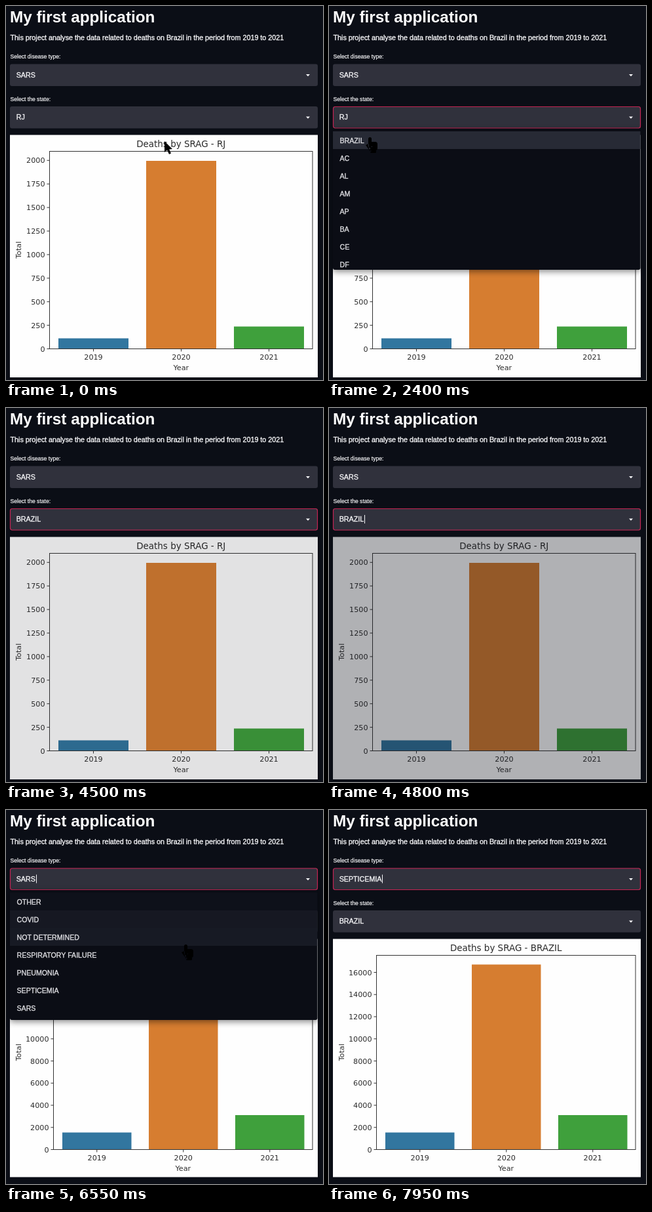
An HTML page with a canvas that plays this animation: 484 by 570 pixels, repeating every 8 s.

```html
<!DOCTYPE html>
<html lang="en">
<head>
<meta charset="utf-8">
<title>My first application</title>
<style>
  html, body { margin: 0; width: 100%; height: 100%; overflow: hidden; background: #0b0e16; }
  canvas { display: block; }
</style>
</head>
<body>
<canvas id="stage" width="484" height="570"></canvas>
<script>
const ctx = document.getElementById('stage').getContext('2d');
const LOOP = 8000;
const BG = '#0b0e16', FIELD = '#30313c', INK = '#f6f6f8';
const UI = '"Liberation Sans", Arial, sans-serif';
const PLOT = '"DejaVu Sans", sans-serif';
const BAR_COLORS = ['#32769f', '#d67d30', '#3fa03c'];

const T = {
  stateClick: 1600, stateOpen: 1760, statePick: 2420,
  fadeStart: 4150, newChart: 5250,
  diseaseClick: 6110, diseaseOpen: 6300, diseasePick: 7440
};

const DISEASES = ['OTHER', 'COVID', 'NOT DETERMINED', 'RESPIRATORY FAILURE', 'PNEUMONIA', 'SEPTICEMIA', 'SARS'];
const STATES = ['BRAZIL', 'AC', 'AL', 'AM', 'AP', 'BA', 'CE', 'DF'];

const RIO = {
  title: 'Deaths by SRAG - RJ', left: 66.5, base: 522, bottom: 566,
  step: 250, gap: 35.9, ticks: 9, barX: 80, barStep: 134, barW: 107,
  tops: [506.5, 236, 488.5]
};
const BRAZIL = {
  title: 'Deaths by SRAG - BRAZIL', left: 72.5, base: 517, bottom: 559.5,
  step: 2000, gap: 33.75, ticks: 9, barX: 86, barStep: 132, barW: 105.5,
  tops: [491.5, 235.5, 465]
};

// Pointer path: time, hotspot x, y, shape
const PATH = [
  [0, 242, 206, 'arrow'], [250, 172, 430, 'arrow'], [400, 205, 500, 'arrow'],
  [860, 456, 177, 'hand'], [1100, 467, 167, 'hand'], [1720, 467, 167, 'hand'],
  [1900, 330, 250, 'hand'], [2250, 62, 200, 'hand'], [2450, 62, 200, 'none'],
  [5500, 478, 476, 'arrow'], [5750, 474, 470, 'arrow'], [6030, 468, 100, 'hand'],
  [6120, 468, 102, 'hand'], [6190, 472, 127, 'beam'], [6300, 455, 140, 'hand'],
  [6600, 260, 210, 'hand'], [6850, 219, 246, 'hand'], [7000, 214, 270, 'hand'],
  [7150, 210, 273, 'hand'], [7450, 210, 273, 'none']
];

const clamp = v => Math.max(0, Math.min(1, v));
const ramp = (t, from, length) => clamp((t - from) / length);
const smooth = u => u * u * (3 - 2 * u);

function pointerAt(t) {
  let i = PATH.length - 1;
  while (i > 0 && PATH[i][0] > t) i--;
  const a = PATH[i], b = PATH[i + 1] || a;
  const u = smooth(ramp(t, a[0], b[0] - a[0] || 1));
  return { x: a[1] + (b[1] - a[1]) * u, y: a[2] + (b[2] - a[2]) * u, shape: a[3] };
}

function text(str, x, y, size, { font = UI, color = INK, align = 'left', weight = '', stroke = 0 } = {}) {
  ctx.font = `${weight} ${size}px ${font}`;
  ctx.textAlign = align;
  ctx.textBaseline = 'alphabetic';
  ctx.fillStyle = ctx.strokeStyle = color;
  ctx.fillText(str, x, y);
  if (stroke) {
    ctx.lineWidth = stroke;
    ctx.strokeText(str, x, y);
  }
}

function roundRect(x, y, w, h, r) {
  ctx.beginPath();
  ctx.roundRect(x, y, w, h, r);
}

function drawHeader() {
  text('My first application', 6, 25, 24.3, { weight: 'bold', color: '#fff' });
  text('This project analyse the data related to deaths on Brazil in the period from 2019 to 2021',
    6.5, 52, 10.75, { stroke: 0.35 });
}

function drawSelect(label, value, top, focus, caret) {
  text(label, 6.5, top - 8.5, 8.6, { stroke: 0.2 });
  roundRect(6, top, 470, 33.5, 3);
  ctx.fillStyle = FIELD;
  ctx.fill();
  if (focus > 0) {
    ctx.globalAlpha = focus;
    roundRect(6.5, top + 0.5, 469, 32.5, 3);
    ctx.strokeStyle = '#c52453';
    ctx.lineWidth = 1.2;
    ctx.stroke();
    ctx.globalAlpha = 1;
  }
  text(value, 15.7, top + 20.3, 10.7, { stroke: 0.35 });
  if (caret) {
    const x = Math.round(15.7 + ctx.measureText(value).width + 1);
    ctx.fillRect(x, top + 10, 1, 13);
  }
  ctx.fillStyle = INK;
  ctx.beginPath();
  ctx.moveTo(458, top + 15.5);
  ctx.lineTo(464, top + 15.5);
  ctx.lineTo(461, top + 18.8);
  ctx.fill();
}

function drawChart(c, opacity) {
  const top = 221.5, right = 468, ink = '#2b2b2b';
  const style = { font: PLOT, color: ink, align: 'center' };
  ctx.fillStyle = '#fefefe';
  ctx.fillRect(6, 196.5, 470, c.bottom - 196.5);

  c.tops.forEach((y, i) => {
    ctx.fillStyle = BAR_COLORS[i];
    ctx.fillRect(c.barX + i * c.barStep, y, c.barW, c.base - y);
  });

  ctx.strokeStyle = '#333';
  ctx.lineWidth = 1;
  ctx.strokeRect(c.left, top, right - c.left, c.base + 0.5 - top);
  for (let i = 0; i < c.ticks; i++) {
    const y = c.base + 0.5 - i * c.gap;
    ctx.fillStyle = '#333';
    ctx.fillRect(c.left - 4, y - 0.5, 4, 1);
    text(i * c.step, c.left - 7, y + 4, 11.2, { ...style, align: 'right' });
  }
  [2019, 2020, 2021].forEach((year, i) => {
    const x = c.barX + i * c.barStep + c.barW / 2;
    ctx.fillStyle = '#333';
    ctx.fillRect(x - 0.5, c.base + 0.5, 1, 4);
    text(year, x, c.base + 17, 11.2, style);
  });

  const mid = (c.left + right) / 2;
  text(c.title, mid, 215, 13.45, style);
  text('Year', mid, c.base + 32.5, 11.2, style);
  ctx.save();
  ctx.translate(23, (top + c.base) / 2);
  ctx.rotate(-Math.PI / 2);
  text('Total', 0, 0, 11.2, style);
  ctx.restore();

  if (opacity < 1) {
    ctx.globalAlpha = 1 - opacity;
    ctx.fillStyle = BG;
    ctx.fillRect(5, 196, 472, c.bottom - 195);
    ctx.globalAlpha = 1;
  }
}

// Share of the last 200 ms the pointer spent on a row
function hoverStrength(t, top, bottom) {
  let hits = 0;
  for (let k = 0; k < 20; k++) {
    const { y } = pointerAt(t - k * 10);
    if (y >= top && y < bottom) hits++;
  }
  return hits / 20;
}

function drawList(items, top, height, t, alpha) {
  if (alpha <= 0) return;
  ctx.save();
  ctx.globalAlpha = alpha;
  ctx.shadowColor = 'rgba(0,0,0,.45)';
  ctx.shadowBlur = 10;
  ctx.shadowOffsetY = 3;
  roundRect(6, top, 469.5, height, 3);
  ctx.fillStyle = '#0b0d15';
  ctx.fill();
  ctx.shadowColor = 'transparent';
  ctx.clip();
  items.forEach((item, i) => {
    const y = top + 4 + i * 27;
    ctx.globalAlpha = alpha * hoverStrength(t, y, y + 27);
    ctx.fillStyle = '#272a35';
    ctx.fillRect(6, y, 470, 27);
    ctx.globalAlpha = alpha;
    text(item, 16.5, y + 17.5, 10.6, { color: '#e0e0e4', stroke: 0.35 });
  });
  ctx.restore();
}

function drawPointer({ x, y, shape }) {
  if (shape === 'none') return;
  ctx.save();
  ctx.translate(Math.round(x), Math.round(y));
  ctx.fillStyle = '#000';
  ctx.beginPath();
  if (shape === 'arrow') {
    [[0, 0], [0, 17], [4, 13.5], [7, 20], [10, 18.5], [7.2, 12.5], [12, 12]]
      .forEach(p => ctx.lineTo(...p));
  } else if (shape === 'hand') {
    ctx.roundRect(-2, 0, 5, 16, 2.5);
    ctx.roundRect(-1, 7, 13, 13, 3.5);
    ctx.roundRect(1, 15, 9, 9, 1.5);
    ctx.moveTo(-2, 10);
    ctx.lineTo(-6, 12);
    ctx.lineTo(2, 23);
    ctx.lineTo(4, 14);
  } else {
    ctx.rect(-1, -8, 2, 17);
    ctx.rect(-4, -9, 8, 2);
    ctx.rect(-4, 8, 8, 2);
  }
  ctx.fill();
  ctx.restore();
}

const blink = (t, since) => (t - since) % 1060 < 530;
const listAlpha = (t, open, pick) => smooth(ramp(t, open, 100)) * (1 - smooth(ramp(t, pick, 150)));

function draw(t) {
  ctx.fillStyle = BG;
  ctx.fillRect(0, 0, 484, 570);

  const statePicked = t >= T.statePick, diseasePicked = t >= T.diseasePick;
  const stateActive = t >= T.stateClick && t < T.diseaseClick;
  const diseaseActive = t >= T.diseaseClick;
  const stateFocus = ramp(t, T.stateClick, 110) * (1 - ramp(t, T.diseaseClick, 80));
  const diseaseFocus = ramp(t, T.diseaseClick, 180);

  drawHeader();
  drawSelect('Select disease type:', diseasePicked ? 'SEPTICEMIA' : 'SARS', 88.5, diseaseFocus,
    diseaseActive && blink(t, diseasePicked ? T.diseasePick : T.diseaseClick));
  drawSelect('Select the state:', statePicked ? 'BRAZIL' : 'RJ', 153, stateFocus,
    stateActive && blink(t, statePicked ? T.statePick : T.stateClick));

  if (t < T.newChart) drawChart(RIO, 1 - 0.67 * Math.pow(ramp(t, T.fadeStart, 1000), 1.7));
  else drawChart(BRAZIL, 1);

  drawList(STATES, 187, 215, t, listAlpha(t, T.stateOpen, T.statePick));
  drawList(DISEASES, 122, 198, t, listAlpha(t, T.diseaseOpen, T.diseasePick));
  drawPointer(pointerAt(t));
}

function frame() {
  draw(performance.now() % LOOP);
  requestAnimationFrame(frame);
}
frame();
</script>
</body>
</html>
```
